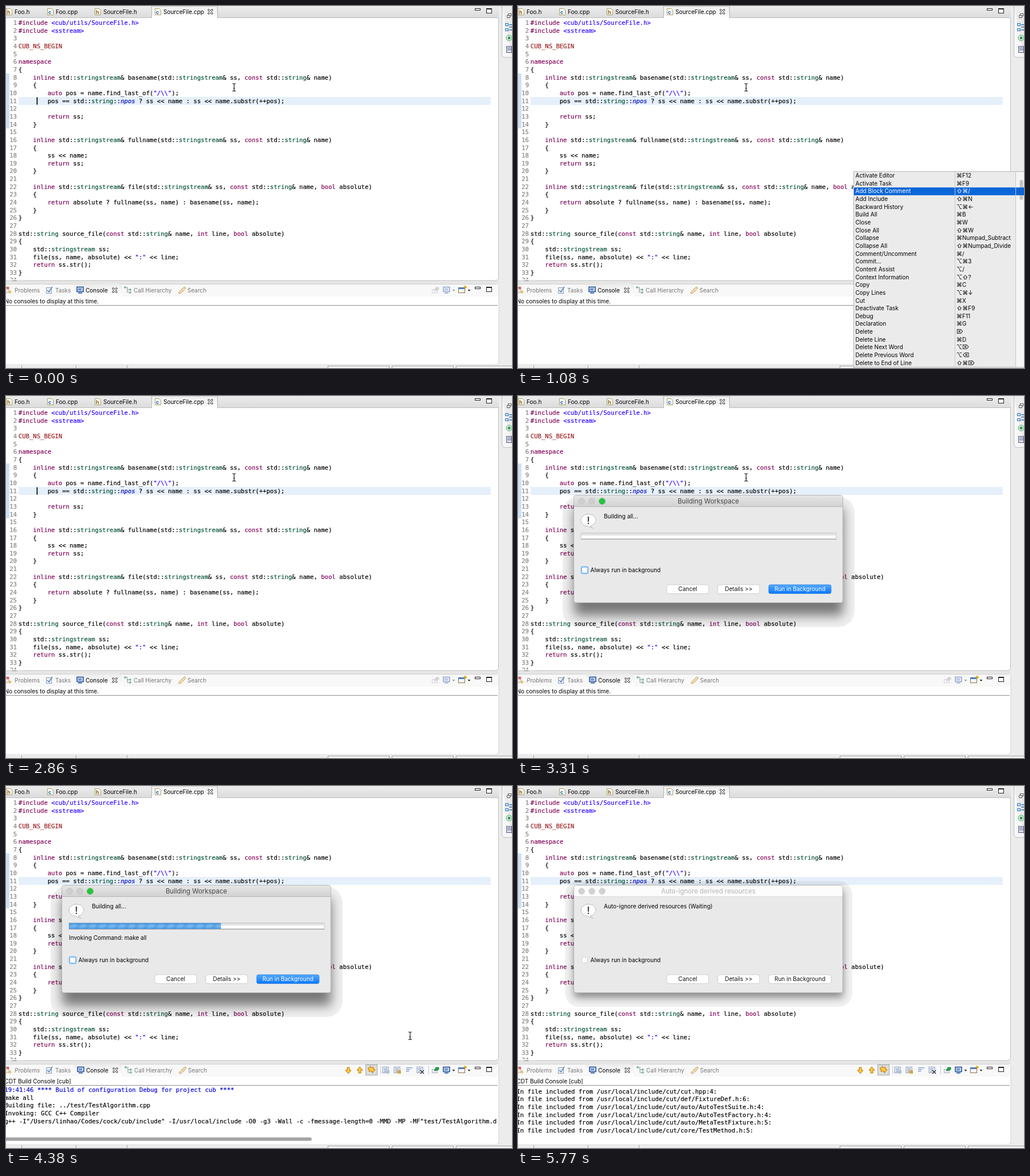
These frames come from a looping animation (884 by 633 pixels, 5.87 s). An HTML page:

```html
<!DOCTYPE html>
<html lang="en">
<head>
<meta charset="utf-8">
<title>Building from the editor</title>
<style>
html, body { margin: 0; width: 100%; height: 100%; overflow: hidden; background: #ececec; }
svg { display: block; }
text { font: 10px Inter, "DejaVu Sans", sans-serif; white-space: pre; }
.mono { font: 10.58px "DejaVu Sans Mono", monospace; fill: currentColor; stroke: currentColor; stroke-width: .18px; }
.title { font-size: 11.4px; }
.italic { font-style: italic; }
.k { color: #7f0055; } .t { color: #005032; } .s { color: #2a00ff; }
.m { color: #9b1c1c; } .n { color: #0000c0; font-style: italic; }
</style>
</head>
<body>
<svg id="stage" width="884" height="633" viewBox="0 0 884 633"></svg>
<script>
const LOOP = 5870, ROW = 13.645;
const stage = document.getElementById('stage');

const esc = s => s.replace(/&/g, '&amp;').replace(/</g, '&lt;').replace(/>/g, '&gt;');
const text = (x, y, s, a = '') => `<text x="${x}" y="${y}" ${a}>${esc(s)}</text>`;
const mono = (x, y, s, a = '') => text(x, y, s, `class="mono" ${a}`);
const rect = (x, y, w, h, fill, a = '') =>
  `<rect x="${x}" y="${y}" width="${w}" height="${h}" fill="${fill}" ${a}/>`;
const path = (d, stroke, w = 1, fill = 'none') =>
  `<path d="${d}" stroke="${stroke}" stroke-width="${w}" fill="${fill}"/>`;
const disc = (x, y, r, fill, a = '') => `<circle cx="${x}" cy="${y}" r="${r}" fill="${fill}" ${a}/>`;
const group = (id, body, a = '') => `<g id="${id}" ${a}>${body}</g>`;
const fade = (id, ...stops) => `<linearGradient id="${id}" x2="0" y2="1">` +
  stops.map((c, i) => `<stop offset="${i / (stops.length - 1)}" stop-color="${c}"/>`).join('') +
  '</linearGradient>';

const defs = `<defs>
  ${fade('bar', '#ececec', '#dcdcdc')}${fade('tab', '#ececec', '#fff')}
  ${fade('head', '#e6e6e6', '#d2d2d2')}${fade('blue', '#55a9fb', '#0a78fb')}
  ${fade('gloss', '#4a93d8', '#79bbf3', '#4f9ae0')}
  <pattern id="wave" width="17" height="12" patternUnits="userSpaceOnUse">
    <path d="M0 12L6 0H13L7 12Z" fill="#3d86d0" opacity=".35"/></pattern>
  <clipPath id="out"><rect y="525" width="859" height="101"/></clipPath></defs>`;

const source = String.raw`#include <cub/utils/SourceFile.h>
#include <sstream>

CUB_NS_BEGIN

namespace
{
    inline std::stringstream& basename(std::stringstream& ss, const std::string& name)
    {
        auto pos = name.find_last_of("/\\");
        pos == std::string::npos ? ss << name : ss << name.substr(++pos);

        return ss;
    }

    inline std::stringstream& fullname(std::stringstream& ss, const std::string& name)
    {
        ss << name;
        return ss;
    }

    inline std::stringstream& file(std::stringstream& ss, const std::string& name, bool absolute)
    {
        return absolute ? fullname(ss, name) : basename(ss, name);
    }
}

std::string source_file(const std::string& name, int line, bool absolute)
{
    std::stringstream ss;
    file(ss, name, absolute) << ":" << line;
    return ss.str();
}
`.split('\n');

const token = /(?<k>#include|\b(?:namespace|inline|auto|return|const|int|bool)\b)|(?<s><[\w/.]+>|".*?")|(?<t>\bstring(?:stream)?\b)|(?<n>\bnpos\b)|(?<m>CUB_NS_BEGIN)/g;

function highlight(line) {
  let out = '', last = 0;
  for (const m of line.matchAll(token)) {
    const kind = Object.keys(m.groups).find(k => m.groups[k]);
    out += esc(line.slice(last, m.index)) + `<tspan class="${kind}">${esc(m[0])}</tspan>`;
    last = m.index + m[0].length;
  }
  return out + esc(line.slice(last));
}

// Icons
const fileIcon = (x, c) => path(`M${x + .5} 4.5h7l3 3v8h-10z`, '#a99b6c', 1, '#fdfcf3') +
  text(x + 2, 13.5, c, `fill="${c === 'h' ? '#8a5a16' : '#1f5fae'}" style="font-weight:700;font-size:9px"`);
const cross = (x, y) => path(`M${x - 4} ${y - 4}h2l2 2.5 2-2.5h2v2l-2.5 2 2.5 2v2h-2l-2-2.5-2 2.5h-2v-2l2.5-2-2.5-2z`, '#333', 1, '#fff');
const winIcons = y => rect(819.5, y - 4.5, 9, 3, '#fff', 'stroke="#222"') +
  rect(839.5, y - 4.5, 9, 8, '#fff', 'stroke="#222"') + rect(839, y - 5, 10, 2, '#222');
const monitor = x => rect(x, 491.5, 11, 8, '#d3e4fa', 'stroke="#27519a" stroke-width="1.6"') +
  rect(x + 2, 494, 6, 1, '#27519a') + rect(x + 2, 496, 6, 1, '#27519a') + rect(x + 2, 501, 7, 1.5, '#27519a');
const drop = x => path(`M${x - 2.5} 496h5l-2.5 3z`, 'none', 0, '#333');
const sheet = (x, c) => rect(x - 6, 491.5, 10, 10, '#eef3fb', 'stroke="#8a97b4"') +
  [494, 496.5, 499].map(y => rect(x - 4, y, 6, 1, '#7189bb')).join('') + rect(x, 497, 6, 6, c);
const arrow = (x, d) => path(`M${x - 2} ${497 - 5 * d}h4v${5 * d}h3l-5 ${6 * d}-5 ${-6 * d}h3z`, '#b87508', 1, '#ffc83d');

function editor() {
  let s = rect(0, 0, 884, 633, '#ececec') + rect(0, 0, 861, 20, 'url(#bar)') +
    path('M0 20.5H860.5V474q0 6-6 6H0', '#bdbdbd', 1, '#fff') +
    path('M254.5 21V0H369.5V21', '#b4b4b4', 1, 'url(#tab)') + rect(255, 20, 114, 1, '#fff');
  [[0, 'h', 'Foo.h'], [72, 'c', 'Foo.cpp'], [155, 'h', 'SourceFile.h'], [260, 'c', 'SourceFile.cpp']]
    .forEach(([x, c, name]) => s += fileIcon(x, c) + text(x + 15, 13.5, name));
  s += cross(357, 10) + winIcons(9) + rect(0, 118, 6, 96, '#cfe0f3') + rect(22, 159, 825, 14, '#e6f0fb');
  source.forEach((line, i) => {
    const y = 33.2 + i * ROW;
    s += mono(19, y, String(i + 1), 'text-anchor="end" color="#808080"') +
      `<text class="mono" x="21.8" y="${y}">${highlight(line)}</text>`;
  });
  s += rect(0, 478, 30, 1.5, '#fff');
  // right-hand trim
  s += path('M866.5 0V84q0 6 6 6H884', '#bdbdbd', 1, '#f7f7f7') +
    rect(877.5, 13.5, 5, 4, '#fff', 'stroke="#555"') + rect(875.5, 16.5, 5, 4, '#fff', 'stroke="#555"') +
    rect(872.5, 30.5, 5, 4, '#cfe2f8', 'stroke="#3274bd"') + rect(872.5, 39.5, 5, 4, '#cfe2f8', 'stroke="#3274bd"') +
    rect(879, 32, 5, 1.5, '#3274bd') + rect(879, 36, 5, 1.5, '#3274bd') + rect(879, 41, 5, 1.5, '#3274bd') +
    disc(879, 56, 5, '#e4f4e7', 'stroke="#4c9d68"') + disc(879, 56, 2.5, '#319755') +
    rect(874.5, 70.5, 9, 11, '#d7dbea', 'stroke="#5d607d"') + rect(876, 73, 7, 1, '#5d607d') + rect(876, 76, 7, 1, '#5d607d');
  // lower panel and status line
  s += rect(0, 481, 861, 5, '#e6e6e6') + path('M0 486.5H855q6 0 6 6V621q0 6-6 6H0', '#d0d0d0', 1, '#fff') +
    rect(0, 487, 860, 21, '#f8f8f8') + path('M112 486.5q7 0 9 6 3 10 8 15H203V493q0-7-8-7z', 'none', 0, 'url(#tab)') +
    rect(0, 508, 860, 16, '#fff') + rect(0, 523, 859, 1, '#8f8f8f') + rect(0, 627, 884, 6, '#ececec');
  for (const x of [27, 122, 211]) s += rect(x, 628, 1, 5, '#a5a5a5');
  for (const x of [562, 674, 786]) s += rect(x + .5, 629.5, 107, 8, '#f3f3f3', 'stroke="#a0a0a0"');
  return s + winIcons(496);
}

function tabs(busy) {
  const shift = busy ? 1 : 0, gray = 'fill="#777"';
  return rect(-3, 492, 8, 9, '#f5e8e8', 'stroke="#b6a3ab"') + disc(3, 493, 2.5, '#d66b6b') + disc(7, 500, 2.5, '#e5c46a') +
    text(15, 501, 'Problems', gray + (busy ? ' class="italic"' : '')) +
    rect(70.5, 492.5, 9, 10, '#eaf0f7', 'stroke="#8ba0b8"') + path('M72 497l3 3 6-9', '#6285b6', 1.5) + text(86, 501, 'Tasks', gray) +
    `<g transform="translate(${shift})">` + monitor(124) + text(139, 501, 'Console') + cross(190, 497) +
    path('M208 492h4v4h5M212 496v5h5', '#829a91') + disc(208, 492, 2, '#8db8a3') + disc(217, 496, 2, '#8db8a3') + disc(217, 501, 2, '#8db8a3') +
    text(223, 501, 'Call Hierarchy', gray) + path('M301 502l6-7 5-4 2 2-4 5-6 5z', '#c5a069', 1, '#f6ddb0') +
    text(317, 501, 'Search', gray) + '</g>';
}

const pin = c => rect(744.5, 495.5, 9, 6, '#f5f5f5', 'stroke="#9aa8bd"') + path('M748 498l3-6h5v4l-5 2z', c, 1, c);
const newView = rect(790.5, 492.5, 11, 9, '#f5f9ff', 'stroke="#8a7440"') + rect(790, 492, 12, 3, '#4a7cc0') +
  path('M802 489v6M799 492h6', '#d6a21c', 2) + drop(809);
const idleTools = group('idleTools', '<g opacity=".45">' + pin('#aaa') + monitor(764) + drop(782) + '</g>' + newView);
const busyTools = group('busyTools', arrow(598, 1) + arrow(618, -1) +
  rect(628.5, 487.5, 20, 18, '#dcdcdc', 'stroke="#aaa"') + path('M632 494l5-4v2h5v4h3l-5 6v-3h-6v-4z', '#b87508', 1, '#ffc83d') +
  rect(654, 489, 1, 15, '#ccc') + sheet(664, '#b7c2d6') + sheet(684, '#d6a84a') +
  rect(699, 492, 11, 1.5, '#8ba4cf') + rect(699, 495, 7, 1.5, '#8ba4cf') + rect(699, 498, 5, 1.5, '#8ba4cf') +
  sheet(724, '#eef3fb') + path('M724 497l6 6M730 497l-6 6', '#333', 1.5) + rect(738, 489, 1, 15, '#ccc') +
  pin('#2f9553') + monitor(764) + drop(782) + newView);

const keys = `Activate Editor|⌘F12
Activate Task|⌘F9
Add Block Comment|⇧⌘/
Add Include|⇧⌘N
Backward History|⌥⌘←
Build All|⌘B
Close|⌘W
Close All|⇧⌘W
Collapse|⌘Numpad_Subtract
Collapse All|⇧⌘Numpad_Divide
Comment/Uncomment|⌘/
Commit...|⌥⌘3
Content Assist|⌥/
Context Information|⌥⇧?
Copy|⌘C
Copy Lines|⌥⌘↓
Cut|⌘X
Deactivate Task|⇧⌘F9
Debug|⌘F11
Declaration|⌘G
Delete|⌦
Delete Line|⌘D
Delete Next Word|⌥⌦
Delete Previous Word|⌥⌫
Delete to End of Line|⇧⌘⌦`.split('\n').map(l => l.split('|'));

const menu = group('menu', rect(587, 290, 297, 343, '#ebebeb') + rect(587, 289, 297, 1, '#b5b5b5') +
  rect(586, 289, 1, 344, '#b5b5b5') + rect(870, 290, 14, 341, '#f5f5f5') + rect(876.5, 304, 6, 35, '#c4c4c4', 'rx="3"') +
  rect(587, 290, 297, 13.6, '#0b66d8', 'id="pick"') + rect(763, 290, 1, 341, '#c8c8c8') + rect(869, 290, 1, 341, '#c8c8c8') +
  rect(587, 631, 297, 1, '#b5b5b5') +
  keys.map(([name, key], i) => `<g class="item">${text(589.5, 300.2 + i * ROW, name)}${text(766, 300.2 + i * ROW, key)}</g>`).join(''));

// A soft shadow inside a faint, hard-edged rim.
const shadow = (side, dy, blur, alpha) =>
  rect(98 - side, 174 + dy - side, 470 + 2 * side, 188 + 2 * side, '#000', `rx="${side + 8}" opacity=".06"`) +
  rect(98, 174 + dy, 470, 188, '#000', `rx="4" opacity="${alpha}" style="filter:blur(${blur}px)"`);

const button = (x, w, label, main) =>
  rect(x, 330, w, 15.5, main ? 'url(#blue)' : '#fff', `rx="3" stroke="${main ? '#2a80e4' : '#c6c6c6'}" stroke-width=".8"`) +
  text(x + w / 2, 341.3, label, `text-anchor="middle" fill="${main ? '#fff' : '#111'}"`);

function dialog(id, title, label, active, extra = '') {
  const light = (x, i) => {
    const [fill, line] = !active ? ['#d2d2d2', '#c4c4c4'] : i === 2 ? ['#27c440', '#1fa833'] : ['#cfcfcf', '#bcbcbc'];
    return disc(x, 184, 5.3, fill, `stroke="${line}" stroke-width=".7"`);
  };
  return group(id, (active ? shadow(20, 22, 10, .5) : shadow(16, 8, 7, .42)) +
    rect(97.5, 173.5, 470, 188, '#e9e9e9', 'rx="4" stroke="#aaa" stroke-width=".8"') +
    path('M98 193V178q0-4 4-4H563q4 0 4 4V193z', 'none', 0, active ? 'url(#head)' : '#fcfcfc') +
    rect(98, 193, 469, 1, active ? '#b9b9b9' : '#d9d9d9') +
    [111, 129, 147].map(light).join('') +
    text(332.5, 188, title, `class="title" text-anchor="middle" fill="${active ? '#444' : '#b2b2b2'}"`) +
    path('M110 217a13 10.5 0 1 1 16 10.3l5 4-9-3.5a13 10.5 0 0 1-12-10.8z', '#bbb', 1, '#fff') +
    text(123, 223.5, '!', 'text-anchor="middle" fill="#444" style="font-size:17px;font-weight:600"') +
    text(150, 214, label) + extra +
    (active ? rect(109.5, 297.5, 14, 14, '#8cc1f4', 'rx="4"') : '') +
    rect(111.5, 299.5, 10, 10, '#fff', `rx="2" stroke="${active ? '#6aabea' : '#c4c4c4'}" stroke-width=".8"`) +
    text(126.5, 308.3, 'Always run in background') +
    button(260, 73, 'Cancel') + button(349, 73, 'Details >>') + button(438, 109, 'Run in Background', active));
}

const progress = rect(110, 239.5, 446, 11, '#fff', 'stroke="#bbb" stroke-width=".8"') + rect(110, 240, 446, 4, '#e2e2e2') +
  rect(110, 249.5, 446, 1.5, '#a6a6a6') +
  rect(110, 239.5, 0, 10.5, 'url(#gloss)', 'class="fill"') + rect(110, 239.5, 0, 10.5, 'url(#wave)', 'class="fill"') +
  group('command', text(110, 269.3, 'Invoking Command: make all'));

const log = ['19:41:46 **** Build of configuration Debug for project cub ****', 'make all',
  'Building file: ../test/TestAlgorithm.cpp', 'Invoking: GCC C++ Compiler',
  'g++ -I"/Users/linhao/Codes/cock/cub/include" -I/usr/local/include -O0 -g3 -Wall -c -fmessage-length=0 -MMD -MP -MF"test/TestAlgorithm.d" -MT'];
const included = ['cut/cut.h:3', 'cut/cut.hpp:4', 'cut/def/FixtureDef.h:6', 'cut/auto/AutoTestSuite.h:4', 'cut/auto/AutoTestFactory.h:4',
  'cut/auto/MetaTestFixture.h:5', 'cut/core/TestMethod.h:5'].map(f => `In file included from /usr/local/include/${f}:`);
const output = (id, lines, y) => group(id, lines.map((l, i) =>
  mono(-2.6, y + i * ROW, l, l.includes('****') ? 'color="#0000e0"' : '')).join(''), 'clip-path="url(#out)"');
const caption = (id, s) => group(id, text(-2.5, 520, s));

stage.innerHTML = defs + editor() + group('idleTabs', tabs(false)) + group('busyTabs', tabs(true)) + idleTools + busyTools +
  caption('none', 'No consoles to display at this time.') + caption('global', 'CDT Global Build Console') +
  caption('project', 'CDT Build Console [cub]') +
  output('start', log.slice(0, 2), 535) + output('compile', log, 535) + output('errors', included, 524) +
  rect(-4, 614.5, 538, 6, '#a3a3a3', 'id="scroll" rx="3"') + rect(53.5, 159.5, 1.7, 13, '#000', 'id="caret"') +
  dialog('building', 'Building Workspace', 'Building all...', true, progress) +
  dialog('waiting', 'Auto-ignore derived resources', 'Auto-ignore derived resources (Waiting)', false) + menu +
  group('mouse', path('M-3-6.5q3 0 3 2 0-2 3-2M0-5V5.5M-3 7q3 0 3-2 0 2 3 2M-1.5 2h3', '#222', 1.2));

const el = id => document.getElementById(id);
const show = (id, on) => el(id).style.display = on ? '' : 'none';
const items = [...document.querySelectorAll('.item')], fills = [...document.querySelectorAll('.fill')];

function render(t) {
  const open = t >= 150 && t < 2860, build = t >= 3310, run = t >= 3780, compile = t >= 3930, done = t >= 5770;
  show('menu', open);
  show('caret', !open && !build);
  const pick = t >= 2270 ? 5 : t < 930 ? 0 : Math.min(6, 1 + Math.floor((t - 930) / 148));
  el('pick').setAttribute('y', 290 + pick * ROW);
  items.forEach((g, i) => g.setAttribute('fill', i === pick ? '#fff' : '#000'));

  show('building', build && !done);
  show('waiting', done);
  show('command', t >= 3480);
  fills.forEach(f => f.setAttribute('width', compile ? 265.5 : t >= 3480 ? 223 : 0));

  show('idleTabs', !build); show('busyTabs', build);
  show('idleTools', !run); show('busyTools', run);
  show('none', !run);
  show('global', run && !compile); show('start', run && !compile);
  show('project', compile); show('compile', compile && !done); show('errors', done);
  show('scroll', compile && t < 5260);
  el('scroll').setAttribute('opacity', t < 5110 ? 1 : .45);

  const p = Math.min(1, Math.max(0, Math.floor((t - 3930) / 150) / 3));
  const ease = p * p * (3 - 2 * p);
  show('mouse', t < 4520);
  el('mouse').setAttribute('transform', `translate(${398.5 + 307.5 * ease} ${142 + 294.5 * ease})`);
}

const begin = performance.now();
function tick() {
  render((performance.now() - begin) % LOOP);
  requestAnimationFrame(tick);
}
tick();
</script>
</body>
</html>
```
